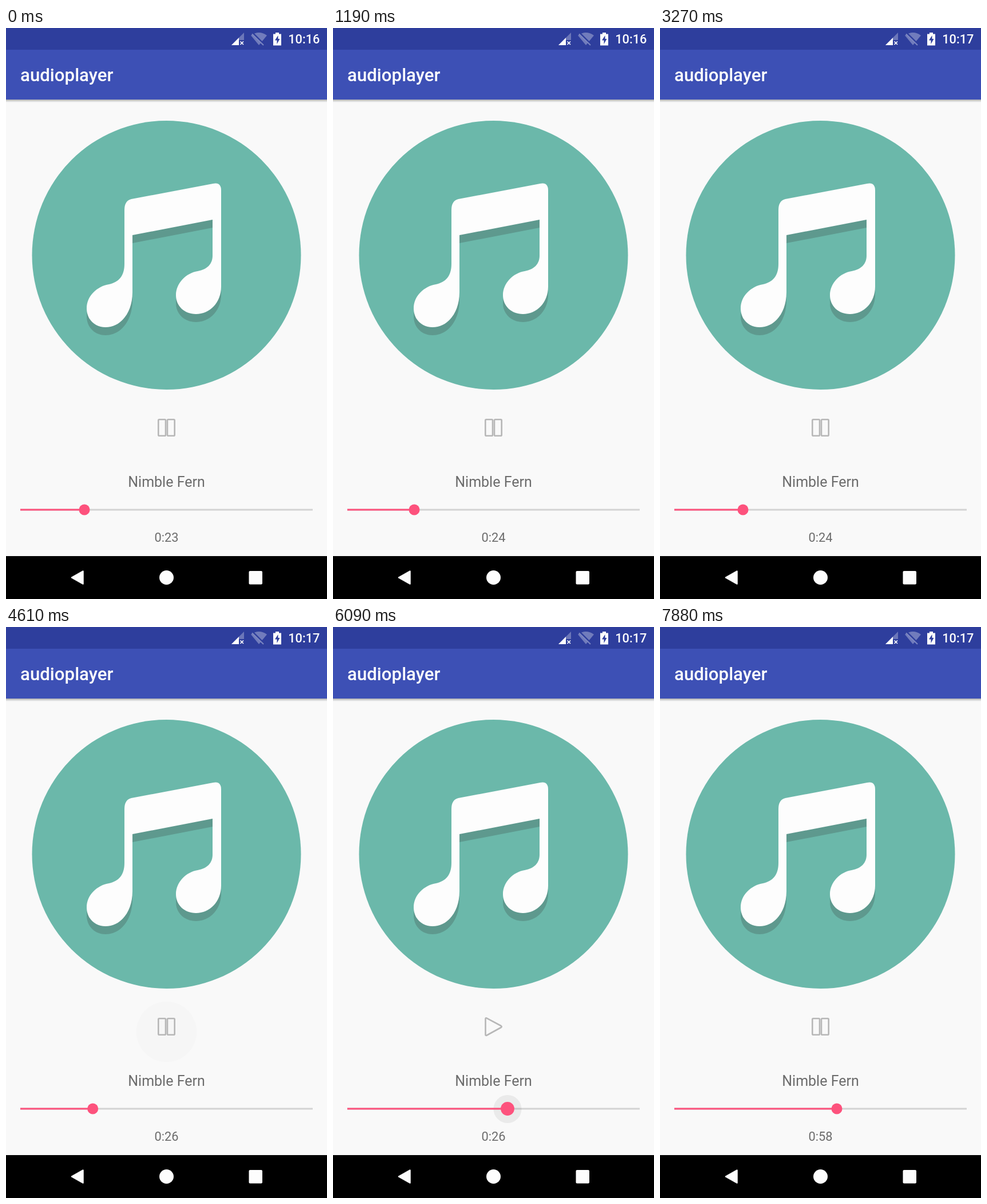
Animation of 561x998 px, one loop 8 s. Source, as an HTML page:

```html
<!DOCTYPE html>
<html lang="en">
<head>
<meta charset="utf-8">
<title>audioplayer</title>
<style>
  html, body { margin: 0; width: 100%; height: 100%; overflow: hidden; background: #f9f9f9; }
  svg { display: block; width: 561px; height: 998px; font-family: Roboto, sans-serif; }
  .title { font-size: 31.2px; font-weight: 500; fill: #fdfdfd; }
  .clock { font-size: 21.8px; font-weight: 500; fill: #fdfdfd; text-anchor: end; }
  .song { font-size: 25px; }
  .time { font-size: 21.8px; }
  .song, .time { fill: #6c6c6c; text-anchor: middle; }
  .icon { fill: none; stroke: #b7b7b7; stroke-width: 2.6; stroke-linejoin: round; }
</style>
</head>
<body>
<svg viewBox="0 0 561 998">
  <defs>
    <linearGradient id="drop" x1="0" y1="0" x2="0" y2="1">
      <stop offset="0" stop-opacity=".3"/>
      <stop offset="1" stop-opacity="0"/>
    </linearGradient>
    <path id="note" d="M207 318Q207 302 219 299L362 272Q376 269 376 284V452C376 480 356 500 332 500
      C312 500 297 486 297 467C297 446 315 428 335 425C352 422 361 412 361 398V335L221 362V462
      C221 497 201 523 174 523C155 523 141 509 141 490C141 468 160 451 180 448C197 444 207 434 207 412Z"/>
  </defs>

  <rect width="561" height="998" fill="#f9f9f9"/>
  <rect y="125" width="561" height="5" fill="url(#drop)"/>
  <rect width="561" height="125" fill="#3d50b5"/>
  <rect width="561" height="38" fill="#2e3e9d"/>
  <text class="title" x="25" y="93">audioplayer</text>

  <!-- status icons -->
  <g fill="#fdfdfd">
    <path d="M394 30L416 8V21H407V30Z" opacity=".3"/>
    <path d="M394 30L407 17V30Z"/>
    <path d="M409.5 23.5L415 29M415 23.5L409.5 29" stroke="#fdfdfd" stroke-width="1.7"/>
    <path d="M428 13Q442 3 456 13L442 30Z" opacity=".33"/>
    <path d="M430 8L452 30" stroke="#2e3e9d" stroke-width="3.5"/>
    <path d="M430 10.500L450 30" stroke="#7d87c2" stroke-width="2"/>
    <path d="M471 8H477V10.500H481V30.500H467V10.500H471Z"/>
    <path d="M475.500 13L470 21.500H473.500V28L478.500 19H475.500Z" fill="#2e3e9d"/>
  </g>
  <text class="clock" id="clock" x="548.500" y="27">10:16</text>

  <!-- artwork -->
  <circle cx="280.500" cy="397" r="235" fill="#6bb8aa"/>
  <use href="#note" y="14" fill="#5e998e"/>
  <use href="#note" fill="#fdfdfd"/>

  <!-- controls -->
  <circle id="ripple" cx="280.500" cy="707.500" r="53"/>
  <g class="icon">
    <g id="pause">
      <rect x="266.300" y="684.300" width="12.700" height="28.400" rx="1.500"/>
      <rect x="282" y="684.300" width="12.700" height="28.400" rx="1.500"/>
    </g>
    <path id="play" d="M266.500 685Q266.500 682.500 269 683.800L293.500 697Q296 698.500 293.500 700L269 713.500Q266.500 714.700 266.500 712.500Z"/>
  </g>
  <text class="song" x="280.500" y="802">Nimble Fern</text>
  <path d="M25 842H536" stroke="#d3d3d3" stroke-width="3"/>
  <circle id="halo" cx="305" cy="842.500" r="24.500"/>
  <path id="done" stroke="#fd527d" stroke-width="3.200"/>
  <circle id="thumb" cy="842" r="9.500" fill="#fd527d"/>
  <text class="time" id="time" x="280.500" y="898">0:23</text>

  <!-- navigation bar -->
  <rect y="923" width="561" height="75"/>
  <g fill="#fdfdfd">
    <path d="M115 960.500L134.500 949.500V971.500Z" stroke="#fdfdfd" stroke-width="2.500" stroke-linejoin="round"/>
    <circle cx="280.500" cy="960.500" r="12.500"/>
    <rect x="424.500" y="949" width="23.500" height="23.500" rx="2"/>
  </g>
</svg>
<script>
  const LOOP = 8000, TICK = 148.5;
  // All schedules below are [tick, value].
  const seek = [[0, 137], [2, 137], [5, 139.5], [6, 139.5], [8, 142], [9, 143.3], [20, 143.4], [22, 145],
    [26, 148.5], [29, 151.7], [38, 151.7], [39, 305], [47, 305], [53, 309]];
  const labels = [[0, '0:23'], [7, '0:24'], [24, '0:25'], [29, '0:26'], [48, '0:57'], [51, '0:58']];
  const clocks = [[0, '10:16'], [13, '10:17']];
  const presses = [[9, 4], [19, 3], [31, 4], [47, 4]]; // value: ticks until faded
  const drag = [39, 5];

  const el = Object.fromEntries([...document.querySelectorAll('svg [id]')].map(n => [n.id, n]));
  const latest = (list, k) => list.filter(([at]) => at <= k).pop()[1];

  function position(k) {
    const i = seek.findIndex(([at]) => at > k);
    if (i < 0) return seek[seek.length - 1][1];
    const [a, x] = seek[i - 1], [b, y] = seek[i];
    return x + (y - x) * (k - a) / (b - a);
  }

  function glow(k, [start, length]) {
    const i = k - start;
    if (i < 0 || i >= length) return 0;
    return i ? 0.1 * (1 - i / length) : 0.012;
  }

  function draw(now) {
    const k = Math.floor((now % LOOP + 2) / TICK);
    const x = position(k);
    const paused = presses.filter(([at]) => at < k).length % 2;
    const held = glow(k, drag);

    el.thumb.setAttribute('cx', x);
    el.thumb.setAttribute('r', 9.5 + held * 40);
    el.done.setAttribute('d', `M25 842H${x}`);
    el.halo.setAttribute('opacity', held);
    el.ripple.setAttribute('opacity', Math.max(...presses.map(p => glow(k, p))));
    el.play.style.display = paused ? '' : 'none';
    el.pause.style.display = paused ? 'none' : '';
    el.time.textContent = latest(labels, k);
    el.clock.textContent = latest(clocks, k);
    requestAnimationFrame(() => draw(performance.now()));
  }
  draw(performance.now());
</script>
</body>
</html>
```
